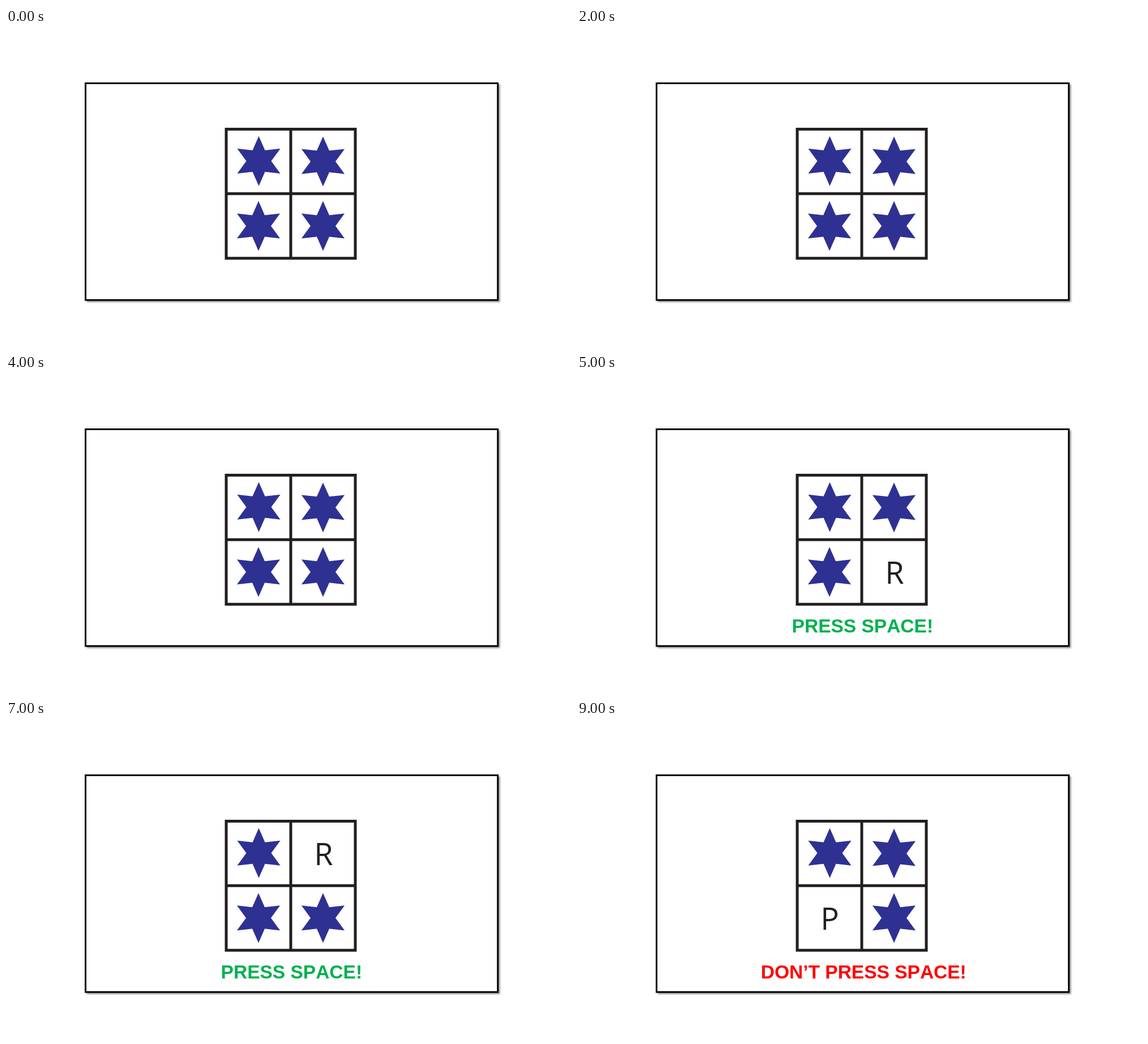
An HTML page with a canvas that plays this animation: 998x561 px, repeating every 10 s.

```html
<!DOCTYPE html>
<html lang="en">
<head>
<meta charset="utf-8">
<title>Letter task</title>
<style>
html, body { margin: 0; width: 100%; height: 100%; overflow: hidden; background: #fff; }
canvas { display: block; }
</style>
</head>
<body>
<canvas id="stage" width="998" height="561"></canvas>
<script>
const ctx = document.getElementById('stage').getContext('2d');
const STEP = 1000;
const INK = '#231f20';

// Star centres: top left, top right, bottom left, bottom right
const cells = [[446.5, 234.7], [560, 235.4], [446, 349.2], [560, 349.2]];

const stop = { text: 'DON’T PRESS SPACE!', color: '#ff0000', letter: 'P' };
const go = { text: 'PRESS SPACE!', color: '#00b050', letter: 'R' };

// One entry per second; null shows only the stars
const steps = [
  null, { ...go, cell: 1, x: 379.6 },
  null, { ...stop, cell: 0, x: 322.6 },
  null, { ...go, cell: 3, x: 379.6 },
  null, { ...go, cell: 1, x: 379.6 },
  null, { ...stop, cell: 2, x: 324.8 }
];

function drawPanel() {
  ctx.save();
  ctx.shadowColor = 'rgba(0,0,0,0.45)';
  ctx.shadowOffsetX = ctx.shadowOffsetY = 2.5;
  ctx.shadowBlur = 3;
  ctx.fillStyle = '#000';
  ctx.fillRect(139, 96, 731.2, 385.4);
  ctx.restore();
  ctx.fillStyle = '#fff';
  ctx.fillRect(142, 99, 725.2, 379.4);
}

function drawGrid() {
  ctx.strokeStyle = INK;
  ctx.lineWidth = 5;
  ctx.strokeRect(389, 178.5, 228, 227.7);
  ctx.beginPath();
  ctx.moveTo(503, 178.5);
  ctx.lineTo(503, 406.2);
  ctx.moveTo(389, 292.3);
  ctx.lineTo(617, 292.3);
  ctx.stroke();
}

function drawStar([x, y]) {
  ctx.beginPath();
  for (let i = 0; i < 12; i++) {
    const r = i % 2 ? 22 : 44;
    const a = i * Math.PI / 6 - Math.PI / 2;
    ctx.lineTo(x + r * Math.cos(a), y + r * Math.sin(a));
  }
  ctx.closePath();
  ctx.fillStyle = '#2e3192';
  ctx.fill();
}

function drawText(text, x, y, font, color) {
  ctx.font = font;
  ctx.fillStyle = color;
  ctx.fillText(text, x, y);
}

function drawStep(step) {
  ctx.fillStyle = '#fff';
  ctx.fillRect(0, 0, 998, 561);
  drawPanel();
  drawGrid();
  cells.forEach((pos, i) => {
    if (!step || step.cell !== i) drawStar(pos);
  });
  if (!step) return;
  const [x, y] = cells[step.cell];
  drawText(step.letter, x - 15.7, y + 20.6, '54px "Open Sans", "Noto Sans", sans-serif', INK);
  drawText(step.text, step.x, 455.6, 'bold 33.5px "Liberation Sans", Arial, sans-serif', step.color);
}

function frame() {
  drawStep(steps[Math.floor(performance.now() / STEP) % steps.length]);
  requestAnimationFrame(frame);
}

ctx.fontKerning = 'none';
frame();
</script>
</body>
</html>
```
